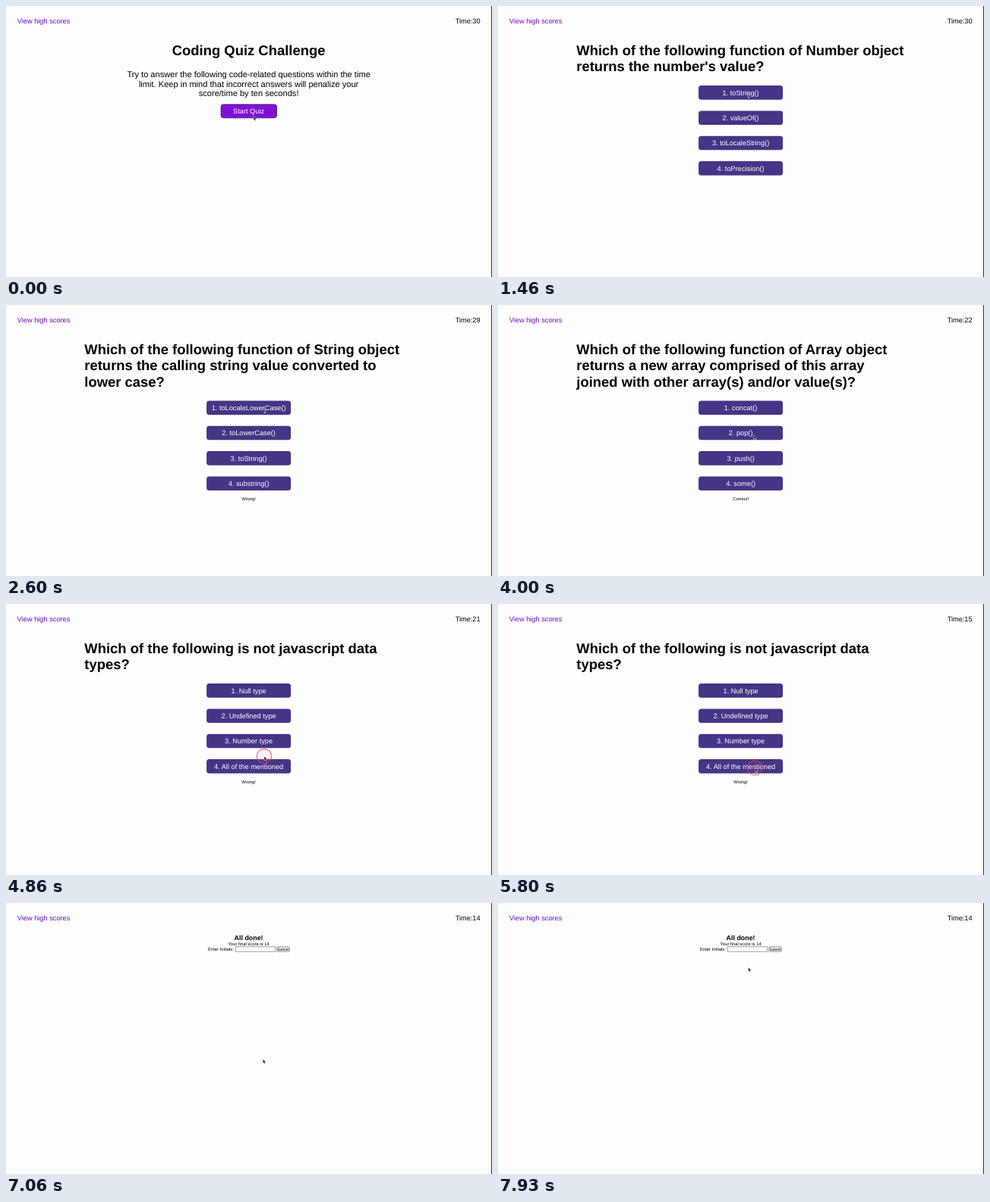
Write an HTML page that moves like this. It is 640 by 358 pixels and loops after 8 s.

```html
<!DOCTYPE html>
<html lang="en">
<head>
<meta charset="utf-8">
<title>Coding quiz</title>
<style>
  html, body { margin: 0; width: 100%; height: 100%; overflow: hidden; background: #fdfdfd; }
  svg { display: block; width: 100%; height: 100%; }
  text { font-family: "Liberation Sans", Arial, sans-serif; font-size: 9.23px; text-rendering: geometricPrecision; }
  .mid { text-anchor: middle; }
  .heading { font-size: 18.46px; font-weight: bold; }
  .intro { font-size: 11.08px; }
  .small { font-size: 5.86px; }
  .label { fill: #fff; text-anchor: middle; }
</style>
</head>
<body>
<svg viewBox="0 0 640 358">
  <rect width="640" height="358" fill="#fdfdfd"/>
  <rect x="639" width="1" height="358" fill="#333"/>
  <text x="14.8" y="23.3" fill="#6a0dc4">View high scores</text>
  <text id="time" x="624.6" y="23.3" text-anchor="end"></text>
  <g id="screen"></g>
  <circle id="ring" r="9.7" fill="#f06080" fill-opacity=".08" stroke="#e0405c" stroke-opacity=".75" stroke-width="1.2"/>
  <g id="cursor">
    <path id="arrow" d="M0 0V5.6L1.3 4.5L2.2 6.5L3.1 6.1L2.3 4.2H4Z" fill="#111" stroke="#fff" stroke-width=".5"/>
    <g id="beam" fill="none">
      <path d="M-1.5 -3.7Q0 -3.7 0 -2.8Q0 -3.7 1.5 -3.7M0 -2.8V2.8M-1.5 3.7Q0 3.7 0 2.8Q0 3.7 1.5 3.7" stroke="#ddd" stroke-width="1.5"/>
      <path d="M-1.5 -3.7Q0 -3.7 0 -2.8Q0 -3.7 1.5 -3.7M0 -2.8V2.8M-1.5 3.7Q0 3.7 0 2.8Q0 3.7 1.5 3.7" stroke="#222" stroke-width=".7"/>
    </g>
  </g>
</svg>
<script>
const LOOP = 8000, MID = 319.6;
const byId = id => document.getElementById(id);

const text = (x, y, cls, str) => `<text x="${x}" y="${y}" class="${cls}">${str}</text>`;
const lines = (x, y, step, cls, list) => list.map((s, i) => text(x, y + i * step, cls, s)).join('');

function question(heading, answers, feedback = '') {
  const top = 62.4 + 21.33 * heading.length;
  const buttons = answers.map((answer, i) => {
    const y = top + i * 33.35;
    return `<rect x="264.1" y="${y}" width="111" height="18.6" rx="3.5" fill="#463486"/>` +
      text(MID, y + 12.5, 'label', `${i + 1}. ${answer}`);
  }).join('');
  return lines(103.3, 65.1, 21.33, 'heading', heading) + buttons +
    text(MID, top + 131.5, 'small mid', feedback);
}

const start =
  text(MID, 65.1, 'heading mid', 'Coding Quiz Challenge') +
  lines(MID, 94, 12.7, 'intro mid', [
    'Try to answer the following code-related questions within the time',
    'limit. Keep in mind that incorrect answers will penalize your',
    'score/time by ten seconds!']) +
  '<rect x="283.1" y="130" width="73.4" height="17.8" rx="3.3" fill="#8010d8" stroke="#3a1060" stroke-width=".8"/>' +
  text(MID, 142.2, 'label', 'Start Quiz');

const done =
  `<g font-weight="bold"><text x="${MID}" y="48.5" class="mid" style="font-size:8.9px">All done!</text></g>` +
  text(MID, 56, 'small mid', 'Your final score is 14') +
  text(266, 63, 'small', 'Enter Initials:') +
  '<rect x="302.2" y="57.8" width="52.2" height="6.4" fill="#fff" stroke="#777" stroke-width=".7"/>' +
  '<rect x="356.6" y="57.8" width="16.8" height="6.4" rx=".8" fill="#efefef" stroke="#777" stroke-width=".7"/>' +
  '<text x="365" y="62.8" class="mid" style="font-size:4.95px">Submit</text>';

const screens = [
  [0, start],
  [1460, question(
    ['Which of the following function of Number object', "returns the number's value?"],
    ['toString()', 'valueOf()', 'toLocaleString()', 'toPrecision()'])],
  [2060, question(
    ['Which of the following function of String object', 'returns the calling string value converted to', 'lower case?'],
    ['toLocaleLowerCase()', 'toLowerCase()', 'toString()', 'substring()'], 'Wrong!')],
  [3730, question(
    ['Which of the following function of Array object', 'returns a new array comprised of this array', 'joined with other array(s) and/or value(s)?'],
    ['concat()', 'pop()', 'push()', 'some()'], 'Correct!')],
  [4800, question(
    ['Which of the following is not javascript data', 'types?'],
    ['Null type', 'Undefined type', 'Number type', 'All of the mentioned'], 'Wrong!')],
  [5860, question(
    ['Which of the following object is the main entry', 'point to all client-side JavaScript features and', 'APIs?'],
    ['Position', 'Window', 'Standard', 'Location'], 'Correct!')],
  [6870, done]
];
const clicks = screens.slice(2).map(([t]) => t);

// One tick per second; a wrong answer costs five more on the next tick.
const clock = [[0, 30], [1730, 29], [2730, 23], [3730, 22], [4730, 21], [5730, 15], [6730, 14]];

// [time, x, y, text cursor]
const path = [
  [0, 326, 145.5, 0], [1459, 326, 145.5, 0],
  [1460, 330, 117, 1], [2060, 338, 118, 1],
  [2330, 341, 138.5, 1], [2700, 341, 138.5, 1],
  [3130, 336.5, 172, 0], [4000, 336.5, 172, 0],
  [4400, 340, 201, 0], [4870, 340, 201, 0],
  [5460, 338.5, 216.5, 0], [6130, 338.5, 216.5, 0],
  [6200, 338, 207, 0], [7480, 338.5, 206, 0],
  [7930, 329.6, 85, 0]
];

const latest = (list, t) => list.findLastIndex(([at]) => at <= t);
const ease = p => p * p * (3 - 2 * p);
let shown = -1;

function draw() {
  const t = performance.now() % LOOP;
  const screen = latest(screens, t);
  if (screen !== shown) byId('screen').innerHTML = screens[shown = screen][1];
  byId('time').textContent = 'Time:' + clock[latest(clock, t)][1];

  const i = latest(path, t), a = path[i], b = path[i + 1] || a;
  const p = b === a ? 0 : ease((t - a[0]) / (b[0] - a[0]));
  const place = `translate(${a[1] + (b[1] - a[1]) * p} ${a[2] + (b[2] - a[2]) * p})`;
  byId('cursor').setAttribute('transform', place);
  byId('ring').setAttribute('transform', place);
  byId('arrow').style.display = a[3] ? 'none' : '';
  byId('beam').style.display = a[3] ? '' : 'none';
  byId('ring').style.display = clicks.some(c => t >= c - 70 && t < c + 130) ? '' : 'none';
  requestAnimationFrame(draw);
}
draw();
</script>
</body>
</html>
```
